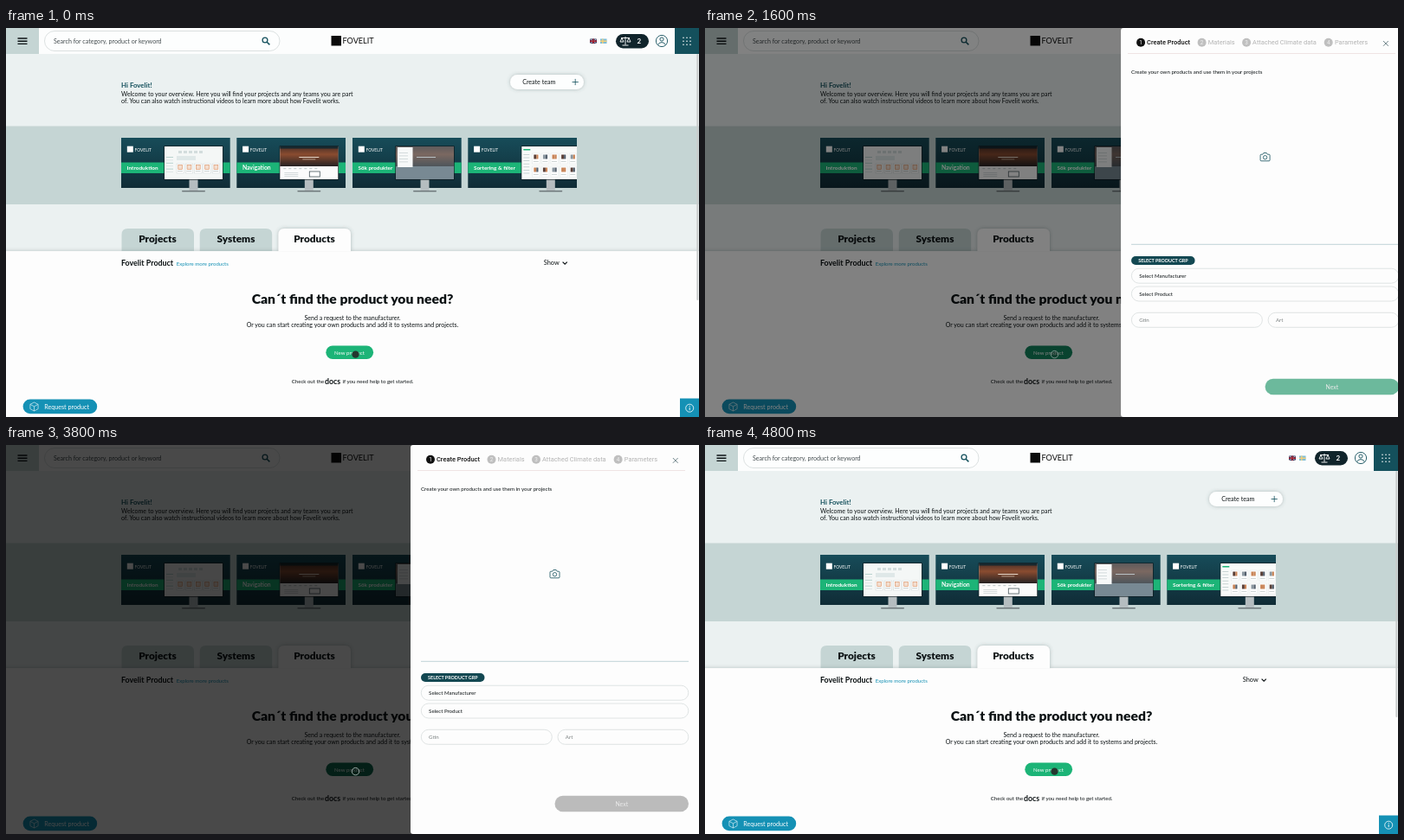
Recreate the animation shown at these times as an HTML page. Size 800 by 450 pixels, loop 4.9 s.

```html
<!DOCTYPE html>
<html lang="en">
<head>
<meta charset="utf-8">
<title>Create product</title>
<style>
  html, body { margin: 0; width: 100%; height: 100%; overflow: hidden; background: #fdfdfd; }
  svg { display: block; width: 100vw; height: 100vh; }
  text { font-family: Lato, "Open Sans", sans-serif; white-space: pre; }
  .step { font-family: Roboto, Inter, sans-serif; }
</style>
</head>
<body>
<svg id="stage" viewBox="0 0 800 450"></svg>
<script>
const LOOP = 4900, STEP = 100, PANEL_W = 333, DIM = 0.71;
const INK = '#0c1214', TEAL = '#14505c', MIST = '#c5d5d4', GREEN = '#1cb477', BLUE = '#1591b5';
const BRAND = 'Fovelit';

const rect = (x, y, w, h, fill, more = '') =>
  `<rect x="${x}" y="${y}" width="${w}" height="${h}" fill="${fill}" ${more}/>`;
const pill = (x, y, w, h, fill, more = '') => rect(x, y, w, h, fill, `rx="${h / 2}" ${more}`);
const text = (x, y, size, str, fill = INK, more = '') =>
  `<text x="${x}" y="${y}" font-size="${size}" fill="${fill}" ${more}>${str}</text>`;
const path = (d, stroke, width = 1, more = '') =>
  `<path d="${d}" fill="none" stroke="${stroke}" stroke-width="${width}" ${more}/>`;
const circle = (x, y, r, fill, more = '') => `<circle cx="${x}" cy="${y}" r="${r}" fill="${fill}" ${more}/>`;
const many = (n, fn) => Array.from({ length: n }, (_, i) => fn(i)).join('');
const BOLD = 'font-weight="700"', BLACK = 'font-weight="900"', MID = 'text-anchor="middle"';

function header() {
  const flags =
    rect(674, 12.5, 8, 5.5, '#2b3560') +
    path('M674 12.5l8 5.5M682 12.5l-8 5.5', '#d9cfd2', 0.9) +
    path('M678 12.5v5.5M674 15.25h8', '#a3202f', 1.5) +
    rect(686, 12.5, 7.5, 5.5, '#7fbdd6') +
    path('M688.8 12.5v5.5M686 15.25h7.5', '#f3cf7a', 1.4);
  const scales = path('M715 10v9.5M711.5 20h7M710 11.5h10M711 11.5l-2 4.5h4zM719 11.5l-2 4.5h4z', '#fff', 0.9);
  return rect(0, 0, 800, 30, '#fcfdfd') +
    rect(0, 0, 38, 30, MIST) +
    path('M13.5 12h11M13.5 15.2h11M13.5 18.4h11', INK, 1.4) +
    pill(44.5, 3.5, 271.5, 23, '#fdfefe', 'stroke="#d3dada" stroke-width=".8"') +
    text(55, 17.6, 7.1, 'Search for category, product or keyword', '#444c4f') +
    circle(299, 14, 2.9, 'none', `stroke="${TEAL}" stroke-width="1.3"`) +
    path('M301.2 16.2l3.2 3.2', TEAL, 1.5) +
    rect(375.5, 9, 11.5, 11.5, '#0b0b0b') +
    text(388.5, 18.2, 9.1, BRAND.toUpperCase(), '#0b0b0b') +
    flags +
    pill(704, 7, 38, 16.5, '#10242b') + scales +
    text(728.4, 18, 8, '2', '#fff', BOLD) +
    circle(757, 15, 6.6, 'none', `stroke="${TEAL}" stroke-width=".9"`) +
    circle(757, 13, 2.1, 'none', `stroke="${TEAL}" stroke-width=".9"`) +
    path('M752.7 19.6q.8-3 4.3-3t4.3 3', TEAL, 0.9) +
    rect(772, 0, 28, 30, TEAL) +
    many(9, i => circle(782 + i % 3 * 4, 11.2 + Math.floor(i / 3) * 4, 0.8, '#fff'));
}

const screens = [
  // product list
  () => rect(0, 0, 67, 38, '#f4f7f6') +
    many(6, i => rect(2, 12 + i * 3.4, 8, 1, i % 2 ? '#dfe6e6' : '#b9d3cf')) +
    many(5, i => rect(16 + i * 6, 5, 4, 3, '#d3dddd')) +
    rect(14, 11, 22, 5, '#dfe8e8') +
    many(5, i => rect(14 + i * 10.3, 20, 8.5, 11, '#fff', 'stroke="#cdd5d5" stroke-width=".5"') +
      rect(15.8 + i * 10.3, 21.5, 4.8, 5, '#f3ded0', 'stroke="#dc9a70" stroke-width=".7"') +
      rect(15 + i * 10.3, 28.3, 6, 0.8, '#b7c1c1')),
  // landing page
  () => rect(0, 0, 67, 38, '#fbfbfb') + rect(0, 0, 67, 23, 'url(#dusk)') + rect(0, 0, 67, 2.5, '#18282e') +
    rect(22, 12, 23, 1, '#e9d8ca') + rect(26, 14.5, 15, 0.8, '#cdb5a2') +
    many(7, i => rect(4 + i * 6, 25, 3, 1.2, '#c6cfd0')) +
    rect(34, 29, 12, 6, '#fff', 'stroke="#46555b" stroke-width=".8"') +
    many(3, i => rect(5, 30 + i * 2, 16, 0.7, '#c6cfd0')),
  // search overlay
  () => rect(0, 0, 67, 38, '#8496a0') + rect(0, 0, 67, 23, 'url(#dusk)') +
    rect(0, 0, 67, 38, '#6f8089', 'opacity=".55"') + rect(24, 12, 22, 1, '#b9c1c4') +
    rect(2, 1, 17.5, 23, '#f7f9f9') +
    many(4, i => rect(4, 7 + i * 3.5, 10, 0.8, '#cbd4d5')),
  // filtered grid
  () => rect(0, 0, 67, 38, '#f8faf9') + rect(2, 3, 8, 1.5, GREEN) +
    many(7, i => rect(2, 9 + i * 3.6, 7, 0.8, '#bccaca')) +
    many(10, i => {
      const x = 12.5 + i % 5 * 10.6, y = 8 + Math.floor(i / 5) * 15;
      return rect(x, y, 8.5, 12, '#fff', 'stroke="#dbe2e2" stroke-width=".4"') +
        rect(x + 1.5, y + 1.5, 3, 5, ['#5a4038', '#8b97a0', '#c98558'][i % 3]) +
        rect(x + 4.5, y + 1.5, 2.2, 5, ['#c98558', '#54606d'][i % 2]) +
        rect(x + 1, y + 9, 6, 0.8, '#c3cccc');
    }),
];

function card(x, title, size, draw, dx) {
  const mid = dx + 33.5;
  return `<g transform="translate(${x} 127)">` +
    rect(0, 0, 125.7, 58, 'url(#night)') +
    rect(0, 28.5, 125.7, 12.5, GREEN) +
    rect(6.8, 9.7, 7, 7, '#fff') +
    text(15.5, 15.8, 4.9, BRAND.toUpperCase(), '#fff') +
    text(6.6, 37, size, title, '#fff', BOLD) +
    rect(mid - 5, 48, 10, 13, '#b5bdc0') +
    pill(mid - 13.5, 61, 27, 1.5, '#6f787b') +
    `<g clip-path="url(#crop)">` + rect(dx - 0.6, 9.4, 68.2, 39.2, '#0d1719') +
    `<g transform="translate(${dx} 10)">${draw()}</g></g></g>`;
}

function page() {
  const tab = (x, name, mid, fill, more = '') =>
    `<path d="M${x} 258.5v-19.5q0-7 7-7h69.5q7 0 7 7v19.5z" fill="${fill}" ${more}/>` +
    text(mid, 248.4, 11.8, name, INK, `${BLACK} ${MID}`);
  return rect(0, 0, 800, 450, '#fdfdfd') +
    rect(0, 30, 800, 228, '#ebf1f1') +
    rect(0, 113.5, 800, 90.5, MIST) +
    text(133, 69, 7.85, `Hi ${BRAND}!`, TEAL, BOLD) +
    text(133, 78.5, 7.06, 'Welcome to your overview. Here you will find your projects and any teams you are part') +
    text(133, 87.1, 7.06, `of. You can also watch instructional videos to learn more about how ${BRAND} works.`) +
    pill(582, 54, 85, 17, '#fdfefe', 'filter="url(#soft)"') +
    text(596.2, 65.3, 7.1, 'Create team') +
    path('M653.6 62.5h7.2M657.2 58.9v7.2', TEAL, 0.8) +
    card(133, 'Introduktion', 6.45, screens[0], 50) +
    card(266.3, 'Navigation', 6.75, screens[1], 50) +
    card(400, 'Sök produkter', 6.25, screens[2], 50) +
    card(533.3, 'Sortering &amp; filter', 6.45, screens[3], 62) +
    tab(133.5, 'Projects', 175, MIST) +
    tab(223.7, 'Systems', 265.5, MIST) +
    rect(-10, 258.3, 820, 200, '#fdfdfd', 'filter="url(#soft)"') +
    tab(314.5, 'Products', 356, '#fdfdfd', 'filter="url(#soft)"') +
    rect(0, 258.3, 800, 192, '#fdfdfd') +
    text(133, 275, 8.9, `${BRAND} Product`, INK, BOLD) +
    text(196.8, 274.6, 6.05, 'Explore more products', BLUE) +
    text(620.8, 273.8, 7.35, 'Show') +
    path('M642.6 270.6l2.6 2.6 2.6-2.6', INK, 1.2) +
    text(400, 319, 15.7, 'Can´t find the product you need?', INK, `${BLACK} ${MID}`) +
    text(400, 338, 7.06, 'Send a request to the manufacturer.', INK, MID) +
    text(400, 346.4, 7.06, 'Or you can start creating your own products and add it to systems and projects.', INK, MID) +
    pill(369.3, 367.6, 54.8, 15.4, GREEN, 'id="create"') +
    text(379, 377.8, 6.1, 'New product', '#fff') +
    text(329.8, 410.8, 6.05, 'Check out the') +
    text(368, 411.5, 8.8, 'docs', INK, BOLD) +
    text(388.6, 410.8, 6.1, 'if you need help to get started.') +
    pill(19.6, 429.6, 85.6, 16.6, BLUE) +
    path('M32.5 433l4.6 2.4v5.2l-4.6 2.4-4.6-2.4v-5.2zM27.9 435.4l4.6 2.4 4.6-2.4M32.5 437.8v5.2', '#d8f0f6', 0.7) +
    text(44.2, 440.5, 7.17, 'Request product', '#fff') +
    rect(778, 428.5, 22, 21.5, BLUE) +
    circle(789.2, 439.7, 4.5, 'none', 'stroke="#fff" stroke-width=".8"') +
    path('M789.2 438.9v3.2M789.2 437v1', '#fff', 0.9) +
    header() +
    rect(797.3, 30, 2, 285, '#c9cccc', 'rx="1"');
}

function panel() {
  const step = (n, cx, x, name) => {
    const on = n === 1;
    return circle(cx, 16.8, 5, on ? '#111' : '#bfbfbf') +
      text(cx, 19.1, 6.4, n, on ? '#fff' : '#f0f0f0', `class="step" ${MID}`) +
      text(x, 19.3, 7.45, name, on ? '#111' : '#b3b3b3', `class="step" font-weight="${on ? 500 : 400}"`);
  };
  const field = (x, y, w, label, color) =>
    pill(x, y, w, 17, '#fdfdfd', 'stroke="#d9dddd" stroke-width=".8"') + text(x + 8.8, y + 10.6, 6.1, label, color);
  return `<path d="M800 0H470q-3 0-3 3v444q0 3 3 3H800z" fill="#fdfdfd"/>` +
    step(1, 490, 497, 'Create Product') +
    step(2, 560.5, 567.6, 'Materials') +
    step(3, 612, 619, 'Attached Climate data') +
    step(4, 706.6, 713.8, 'Parameters') +
    path('M769.9 15l5.8 5.8M775.7 15l-5.8 5.8', '#4d666c', 0.8) +
    path('M475 29.5H784', '#ecdfdf', 0.8) +
    text(479, 52.7, 6.16, 'Create your own products and use them in your projects') +
    path('M629 146.2h1.8l1-1.7h3.4l1 1.7h1.8q1 0 1 1v5.6q0 1-1 1h-9q-1 0-1-1v-5.6q0-1 1-1z', TEAL, 0.8) +
    circle(633.5, 149.7, 2.2, 'none', `stroke="${TEAL}" stroke-width=".8"`) +
    path('M479 250.3H788', '#b9d0d3', 0.9) +
    pill(479, 264, 73.5, 10, '#134852') +
    text(515.8, 271, 5.36, 'SELECT PRODUCT GRP', '#fff', `${BOLD} ${MID}`) +
    field(479.3, 278.2, 308.5, 'Select Manufacturer', INK) +
    field(479.3, 299, 308.5, 'Select Product', INK) +
    field(479.3, 329.3, 151, 'Gtin', '#7b8080') +
    field(637, 329.3, 150.8, 'Art', '#7b8080') +
    pill(633.5, 405.8, 154.5, 18.4, GREEN, 'id="next"') +
    text(710.8, 417.5, 6.9, 'Next', '#eaeaea', MID);
}

const stage = document.getElementById('stage');
stage.innerHTML = `<defs>
  <linearGradient id="night" x2="0" y2="1"><stop stop-color="#174c59"/><stop offset="1" stop-color="#102c36"/></linearGradient>
  <linearGradient id="dusk" x2="0" y2="1"><stop stop-color="#4a2f27"/><stop offset=".4" stop-color="#8a4c30"/><stop offset="1" stop-color="#262223"/></linearGradient>
  <clipPath id="crop"><rect width="125.7" height="58"/></clipPath>
  <filter id="soft" x="-10%" y="-30%" width="120%" height="170%"><feDropShadow dx="0" dy="0" stdDeviation="2.2" flood-color="#3c5a5a" flood-opacity=".38"/></filter>
</defs>
${page()}
${rect(0, 0, 800, 450, '#000', 'id="dim"')}
${circle(403.5, 377.6, 4.2, '#24372f', 'id="cursor" stroke-width=".7"')}
<g id="panel">${panel()}</g>`;

const el = id => document.getElementById(id);
const [dim, drawer, create, next, cursor] = ['dim', 'panel', 'create', 'next', 'cursor'].map(el);

const span = (t, a, b) => Math.min(1, Math.max(0, (t - a) / (b - a)));
const smooth = x => x * x * (3 - 2 * x);
const easeOut = x => 1 - (1 - x) ** 3;
const easeInOut = x => x < 0.5 ? 4 * x ** 3 : 1 - 4 * (1 - x) ** 3;
const mix = (a, b, k) => `rgb(${a.map((v, i) => Math.round(v + (b[i] - v) * k))})`;

function draw(t) {
  const enter = easeOut(span(t, 1435, 1685));
  const leave = easeInOut(span(t, 4315, 4615));
  const shade = smooth(span(t, 1430, 1700)) * (1 - smooth(span(t, 4200, 4490)));
  const out = 1 - enter + leave;

  drawer.setAttribute('transform', `translate(${(out * PANEL_W).toFixed(2)} 0)`);
  drawer.setAttribute('visibility', out >= 1 ? 'hidden' : 'visible');
  dim.setAttribute('opacity', (DIM * shade).toFixed(3));

  const pressed = t >= 1400 && t < 1500;
  create.setAttribute('fill', pressed ? '#146f4c' : mix([28, 180, 119], [14, 108, 80], shade));
  next.setAttribute('fill', mix([28, 183, 124], [187, 187, 187], span(t, 1500, 1700)));
  cursor.setAttribute('fill-opacity', (1 - shade).toFixed(2));
  cursor.setAttribute('stroke', `rgba(215,224,221,${shade.toFixed(2)})`);
}

const start = performance.now();
function tick() {
  const t = (performance.now() - start) % LOOP;
  draw(Math.floor(t / STEP) * STEP);
  requestAnimationFrame(tick);
}
tick();
</script>
</body>
</html>
```
